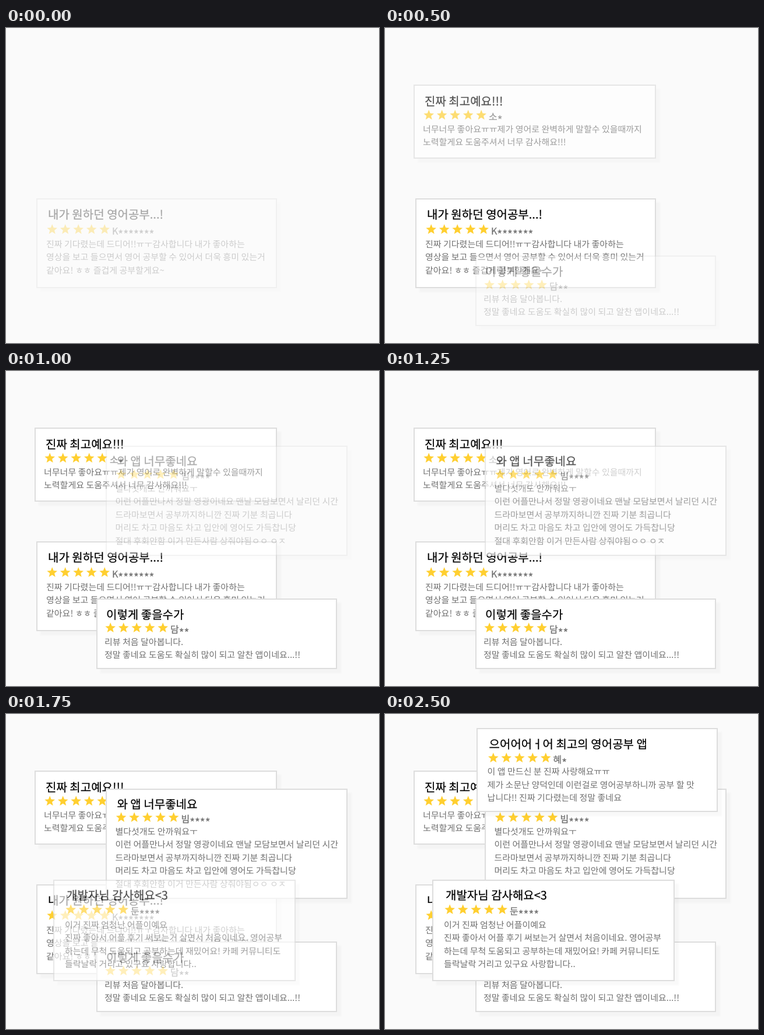
An HTML page that plays this animation: 640 px wide and 540 px high, repeating every 3000 ms.

```html
<!DOCTYPE html>
<html lang="ko">
<head>
<meta charset="utf-8">
<title>리뷰</title>
<style>
html, body { margin: 0; width: 100%; height: 100%; overflow: hidden; background: #fafafa; }
svg { display: block; width: 640px; height: 540px; }
text {
  font-family: "Noto Sans CJK KR", "Noto Sans KR", "Noto Sans CJK JP", "Noto Sans CJK", sans-serif;
  font-weight: 400; white-space: pre; text-rendering: geometricPrecision;
}
.title { font-size: 20px; fill: #000; stroke: #000; stroke-width: .25px; }
.name { font-size: 16px; fill: #707070; stroke: #707070; stroke-width: .25px; }
.mask { font-size: 19px; }
.body { font-size: 15px; fill: #707070; }
</style>
</head>
<body>
<svg id="stage" viewBox="0 0 640 540">
  <defs>
    <filter id="soft" x="-5%" y="-10%" width="110%" height="120%"><feGaussianBlur stdDeviation="1.8"/></filter>
  </defs>
</svg>
<script>
const LOOP = 3000, STEP = 250;
const LEVELS = [0.33, 0.67, 1];
const LINE = 22.5;
const SPACE = 0.228; // word gap in em
const stage = document.getElementById('stage');

// box: x, y, right, bottom; left: text origin; rows: title, star and body centres
const cards = [
  { start: 0, box: [52, 292, 465, 446], left: 69, rows: [320, 345, 370.3],
    title: '내가 원하던 영어공부...!', name: 'K', hidden: 7,
    lines: ['진짜 기다렸는데 드디어!!ㅠㅜ감사합니다 내가 좋아하는',
            '영상을 보고 들으면서 영어 공부할 수 있어서 더욱 흥미 있는거',
            '같아요! ㅎㅎ 즐겁게 공부할게요~'] },
  { start: 250, box: [49, 97, 465, 224], left: 65, rows: [125.5, 149, 173],
    title: '진짜 최고예요!!!', name: '소', hidden: 1,
    lines: ['너무너무 좋아요ㅠㅠ제가 영어로 완벽하게 말할수 있을때까지',
            '노력할게요 도움주셔서 너무 감사해요!!!'] },
  { start: 500, box: [155, 390, 568, 511], left: 169, rows: [417.7, 440, 464],
    title: '이렇게 좋을수가', name: '담', hidden: 2,
    lines: ['리뷰 처음 달아봅니다.',
            '정말 좋네요 도움도 확실히 많이 되고 알찬 앱이네요...!!'] },
  { start: 1000, box: [171, 128, 586, 317], left: 187.4, rows: [154.5, 177, 201],
    title: '와 앱 너무좋네요', name: '빔', hidden: 4,
    lines: ['별다섯개도 안까워요ㅜ',
            '이런 어플만나서 정말 영광이네요 맨날 모담보면서 날리던 시간',
            '드라마보면서 공부까지하니깐 진짜 기분 최곱니다',
            '머리도 차고 마음도 차고 입안에 영어도 가득찹니당',
            '절대 후회안함 이거 만든사람 상줘야됨ㅇㅇ ㅇㅈ'] },
  { start: 1500, box: [81, 284, 497, 458], left: 101, rows: [310.7, 335, 361],
    title: '개발자님 감사해요<3', name: '둔', hidden: 4,
    lines: ['이거 진짜 엄청난 어플이예요',
            '진짜 좋아서 어플 후기 써보는거 살면서 처음이네요. 영어공부',
            '하는데 무척 도움되고 공부하는데 재밌어요! 카페 커뮤니티도',
            '들락날락 거리고 있구요 사랑합니다..'] },
  { start: 2000, box: [157, 24, 571, 168], left: 175.6, rows: [51.5, 75, 98.5],
    title: '으어어어ㅓ어 최고의 영어공부 앱', name: '혜', hidden: 1,
    lines: ['이 앱 만드신 분 진짜 사랑해요ㅠㅠ',
            '제가 소문난 양덕인데 이런걸로 영어공부하니까 공부 할 맛',
            '납니다!! 진짜 기다렸는데 정말 좋네요'] }
];

function add(parent, tag, attrs, text) {
  const el = document.createElementNS('http://www.w3.org/2000/svg', tag);
  for (const key in attrs) el.setAttribute(key, attrs[key]);
  if (text) el.textContent = text;
  parent.appendChild(el);
  return el;
}

// word-spacing that brings the font's own space to SPACE em
function wordSpacing(cls) {
  const probe = add(stage, 'text', { class: cls }, '가 가');
  const size = parseFloat(getComputedStyle(probe).fontSize);
  const spaced = probe.getComputedTextLength();
  probe.textContent = '가가';
  const gap = spaced - probe.getComputedTextLength();
  probe.remove();
  return (SPACE * size - gap).toFixed(2);
}

const spacing = { title: wordSpacing('title'), body: wordSpacing('body') };

function addLine(parent, cls, x, y, text) {
  add(parent, 'text', { class: cls, x, y, 'word-spacing': spacing[cls] }, text);
}

function starPoints(cx, cy) {
  const points = [];
  for (let i = 0; i < 10; i++) {
    const r = i % 2 ? 4.1 : 9.3;
    const a = i * Math.PI / 5 - Math.PI / 2;
    points.push((cx + r * Math.cos(a)).toFixed(2) + ',' + (cy + r * Math.sin(a)).toFixed(2));
  }
  return points.join(' ');
}

function build(card) {
  const g = add(stage, 'g', {});
  const [x, y, right, bottom] = card.box;
  const [titleY, starY, bodyY] = card.rows;
  const left = card.left, w = right - x, h = bottom - y;

  add(g, 'rect', { x: x + 7, y: y + 7, width: w, height: h, fill: '#000', 'fill-opacity': 0.025, filter: 'url(#soft)' });
  add(g, 'rect', { x: x + 1, y: y + 1, width: w - 2, height: h - 2, fill: '#fff', stroke: '#ddd', 'stroke-width': 2 });
  addLine(g, 'title', left + 3, titleY + 7.4, card.title);
  for (let i = 0; i < 5; i++) {
    add(g, 'polygon', { points: starPoints(left + 10.2 + i * 22.5, starY + 0.5), fill: '#ffcf30' });
  }
  const name = add(g, 'text', { class: 'name', x: left + 113, y: starY + 8.5 }, card.name);
  add(name, 'tspan', { class: 'mask', dy: 7 }, '*'.repeat(card.hidden));
  card.lines.forEach((line, i) => addLine(g, 'body', left, bodyY + 5.6 + i * LINE, line));
  return g;
}

const groups = cards.map(build);

function draw(time) {
  const t = time % LOOP;
  cards.forEach((card, i) => {
    const step = Math.floor((t - card.start) / STEP);
    groups[i].setAttribute('opacity', step < 0 ? 0 : LEVELS[Math.min(step, 2)]);
  });
}

let origin = null;
function tick(now) {
  if (origin === null) origin = now;
  draw(now - origin);
  requestAnimationFrame(tick);
}
draw(0);
requestAnimationFrame(tick);
</script>
</body>
</html>
```
